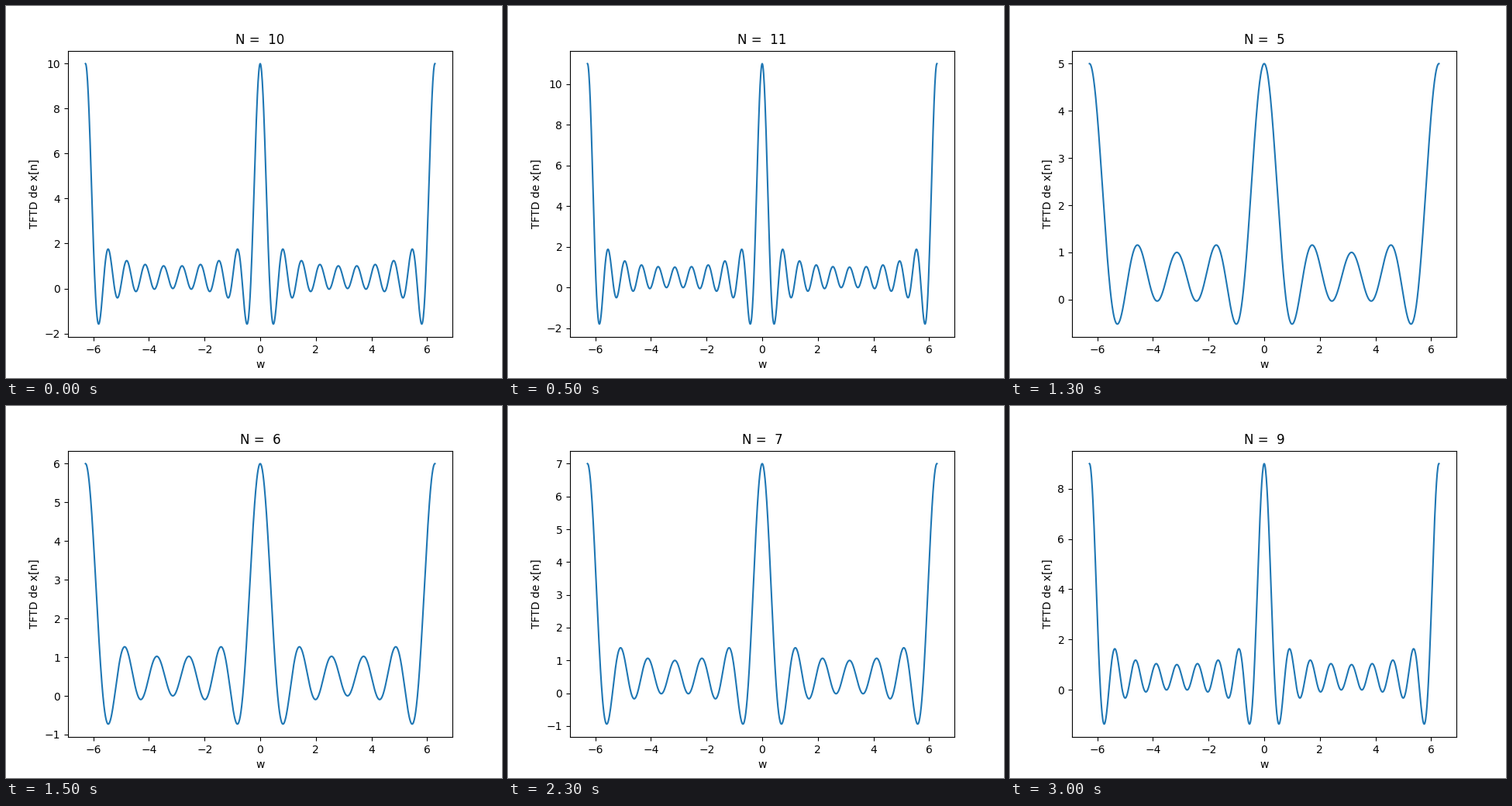
Recreate the animation shown at these times as a matplotlib script. Size 640 px wide and 480 px high, loop 3.5 s.

```python
import numpy as np
import matplotlib.pyplot as plt
from matplotlib.animation import FuncAnimation

LENGTHS = [10, 11, 5, 6, 7, 8, 9]
w = np.linspace(-2 * np.pi, 2 * np.pi, 1001)

fig, ax = plt.subplots(figsize=(6.4, 4.8), dpi=100)


def spectrum(n):
    """Real part of the transform of a rectangular pulse of n samples."""
    return np.cos(np.outer(np.arange(n), w)).sum(axis=0)


def draw(i):
    n = LENGTHS[i % len(LENGTHS)]
    ax.clear()
    ax.plot(w, spectrum(n), color="#1f77b4", lw=1.5)
    ax.set_title(f"N =  {n}")
    ax.set_xlabel("w")
    ax.set_ylabel("TFTD de x[n]")
    return ax.lines


anim = FuncAnimation(fig, draw, frames=len(LENGTHS), init_func=lambda: draw(0),
                     interval=500, repeat=True, repeat_delay=0)
plt.show()
```
